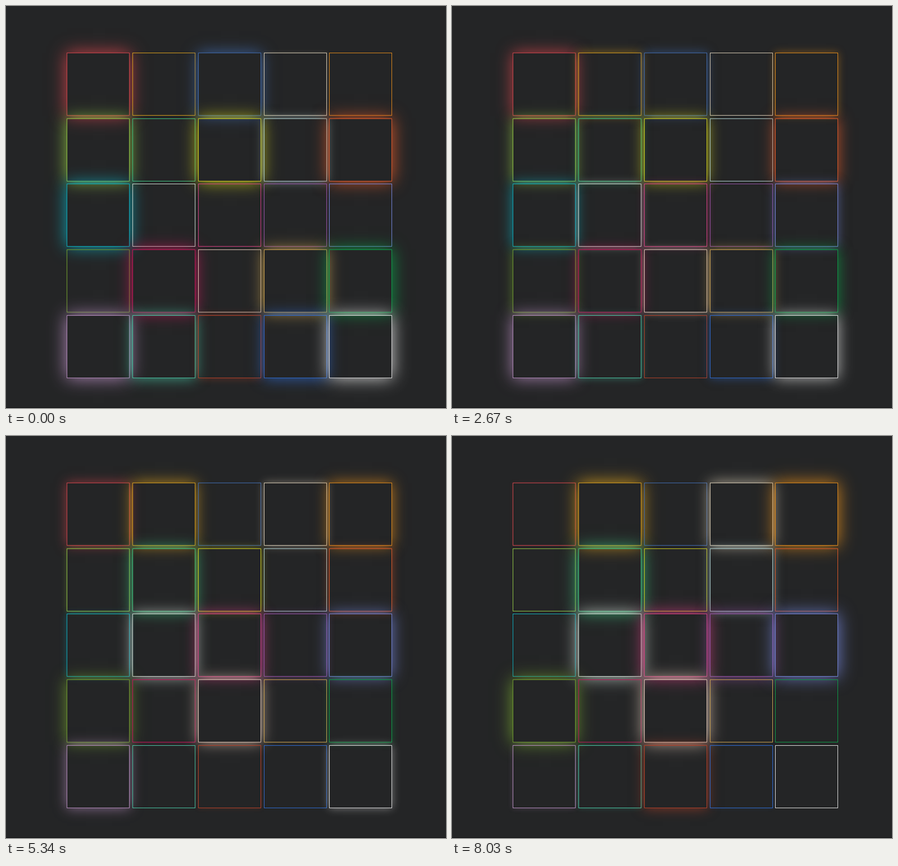
Animation, 783 px wide and 715 px high, one loop 8130 ms. Source, as an HTML page:

```html
<!DOCTYPE html>
<html lang="en">
<head>
<meta charset="utf-8">
<title>Glowing grid</title>
<style>
html, body { margin: 0; width: 100%; height: 100%; overflow: hidden; background: #242526; }
#stage { position: relative; width: 783px; height: 715px; overflow: hidden; box-sizing: border-box; border-bottom: 1px solid #101011; }
#stage div { position: absolute; width: 110px; height: 110px; border: 1px solid; }
</style>
</head>
<body>
<div id="stage"></div>
<script>
const LOOP = 8130, STEP = 147.9, HALF = 1500, BLUR = 30, PITCH = 116.8;

// Colour and time of full glow (ms) for each cell, row by row
const cells = [
  ['#c8434a', 250], ['#d29a1e', 1630], ['#3f68a8', 640], ['#d0c4ae', 1260], ['#d8861c', 1580],
  ['#8fc044', 500], ['#3fbf7f', 1610], ['#c8c81e', 400], ['#a8c8c8', 1000], ['#d8582a', 380],
  ['#0fa8b8', 470], ['#c8d4cc', 1600], ['#d04080', 1560], ['#9050a0', 1230], ['#7080d0', 1660],
  ['#6f9a30', 1690], ['#c01858', 550], ['#d8c0b0', 1600], ['#c8a050', 620], ['#0f9a48', 450],
  ['#b088b8', 190], ['#48c0a0', 770], ['#b04028', 1100], ['#2f68c8', 710], ['#d8d8d8', 390]
].map(([color, peak], i) => {
  const el = document.createElement('div');
  el.style.left = Math.round(108.2 + PITCH * (i % 5)) + 'px';
  el.style.top = Math.round(82.8 + PITCH * Math.floor(i / 5)) + 'px';
  el.style.borderColor = color;
  document.getElementById('stage').append(el);
  const rgb = [1, 3, 5].map(k => parseInt(color.slice(k, k + 2), 16)).join();
  return { el, rgb, peak };
});

const bezier = (a, b, s) => 3 * a * s * (1 - s) ** 2 + 3 * b * s * s * (1 - s) + s ** 3;

// cubic-bezier(.25, .1, .25, 1)
function ease(x) {
  let lo = 0, hi = 1;
  for (let i = 0; i < 20; i++) {
    const mid = (lo + hi) / 2;
    if (bezier(.25, .25, mid) < x) lo = mid; else hi = mid;
  }
  return bezier(.1, 1, lo);
}

function draw() {
  const t = Math.floor(performance.now() % LOOP / STEP) * STEP;
  for (const { el, rgb, peak } of cells) {
    const phase = (t - peak + 4 * HALF) % (2 * HALF);
    const glow = ease(Math.abs(phase - HALF) / HALF);
    el.style.boxShadow = `0 0 ${(BLUR * glow).toFixed(2)}px rgba(${rgb},${glow.toFixed(3)})`;
  }
  requestAnimationFrame(draw);
}
draw();
</script>
</body>
</html>
```
